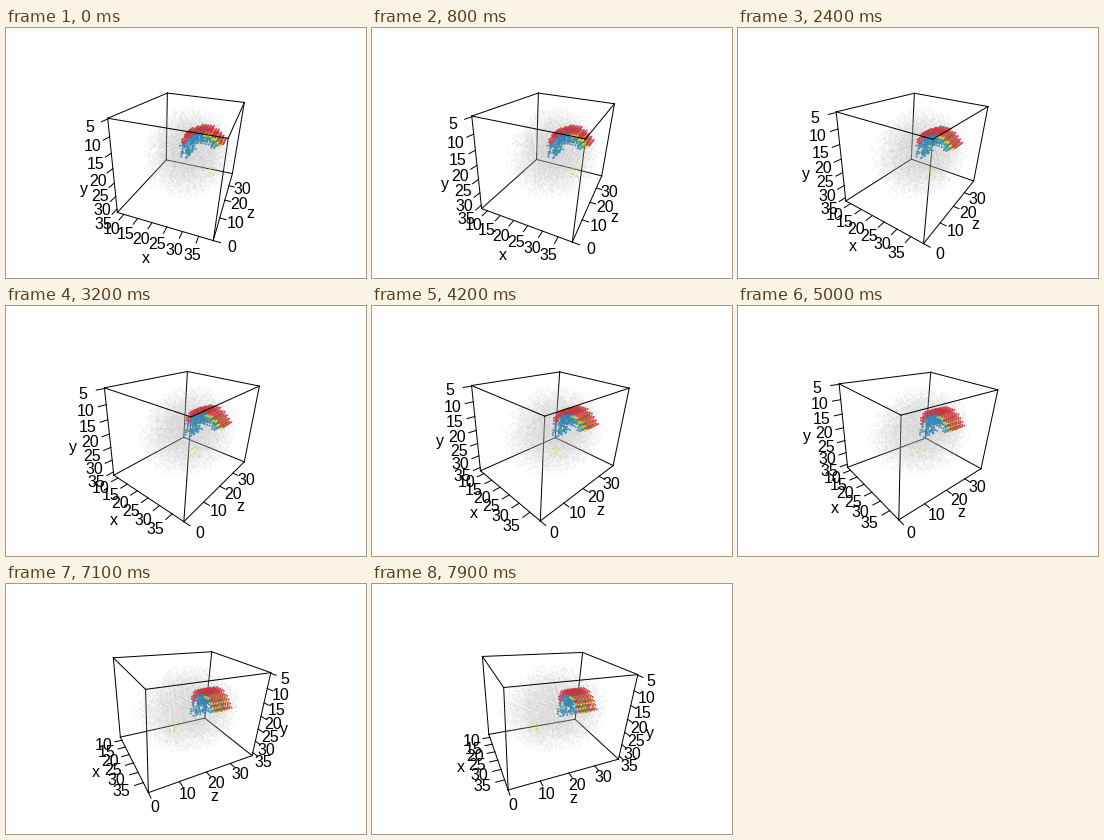
Animation, 360 px wide and 250 px high, one loop 8 s. Source, as a matplotlib script:

```python
import numpy as np
import matplotlib.pyplot as plt
from matplotlib.animation import FuncAnimation
from matplotlib.colors import to_rgba_array

W, H = 360, 250
FRAMES, STEP_MS = 80, 100
FOCAL = 222
START, STEP = 17.0, 0.6            # degrees of spin
TILT, ROLL = np.radians(25.7), np.radians(3.4)
HALF = np.array([0.2026, 0.2016, 0.2572])
LOW = np.array([7.6, 4.8, 0.0])
UNIT = 2 * HALF[1] / 31.6
TICK = 2 * HALF / 15
FONT = dict(family="Liberation Sans", size=11.5, color="black")

# Fixed frame: spin axis (down), sideways and towards the viewer
down = np.array([-np.sin(ROLL) * np.cos(TILT), np.cos(ROLL) * np.cos(TILT), -np.sin(TILT)])
side = np.array([np.cos(ROLL), np.sin(ROLL), 0])
near = np.cross(side, down)


def basis(theta):
    c, s = np.cos(theta), np.sin(theta)
    return np.array([c * side + s * near, down, s * side - c * near])


def project(points, axes):
    cam = np.atleast_2d(points) @ axes
    xy = FOCAL * cam[:, :2] / (1 - cam[:, 2:]) + (W / 2, H / 2)
    return xy, cam[:, 2]


def lattice(half):
    n = np.ceil(half / UNIT).astype(int)
    g = np.meshgrid(*[np.arange(-k, k + 1) * UNIT for k in n], indexing="ij")
    return np.stack([a.ravel() for a in g], axis=1)


rng = np.random.default_rng(4)
cells = lattice(HALF)

# Pale body: an ellipsoid that thins out towards its rim
reach = (((cells - (0.01, -0.005, 0.01)) / HALF) ** 2).sum(1)
body = cells[rng.random(len(cells)) < 1.05 - reach]

# Hook-shaped region: an arch in the x-y plane, coloured by layer
dx, dy, dz = (cells - (0.062, 0.008, 0.095)).T
rho = np.hypot(dx, dy)
phi = np.degrees(np.arctan2(-dy, dx)) % 360
arch = (rho > 0.045) & (rho < 0.114) & (phi > 30) & (phi < 210) & (abs(dz) < 0.045)
arch &= rng.random(len(cells)) < np.where(phi > 150, 0.45, np.where(rho > 0.08, 1, 0.75))
hook, rho, phi, dz = cells[arch], rho[arch], phi[arch], dz[arch]
RED, BLUE, GREEN, YELLOW = "#cf3240", "#3584b8", "#45a049", "#e2d52a"
tint = np.where((rho > 0.09) & (phi < 175), RED, BLUE)
tint[(rho <= 0.09) & (dz > -0.02) & (phi < 85)] = GREEN
tint[(rho > 0.082) & (rho <= 0.092) & (phi < 95)] = YELLOW
tint[rng.random(len(tint)) < 0.08] = GREEN
stray = rng.normal((0.144, -0.01, -0.13), (0.008, 0.014, 0.008), (8, 3))
marks = np.vstack([hook, np.round(stray / UNIT) * UNIT])
rgba = to_rgba_array(np.append(tint, [YELLOW] * len(stray)), alpha=0.85)
rgba[-len(stray):, 3] = 0.6

corners = np.array([(x, y, z) for x in (-1, 1) for y in (-1, 1) for z in (-1, 1)])
edges = [(a, b) for a in corners for b in corners
         if abs(a - b).sum() == 2 and a.sum() < b.sum()]

fig = plt.figure(figsize=(W / 100, H / 100), dpi=100, facecolor="white")
ax = fig.add_axes([0, 0, 1, 1])
ax.set(xlim=(0, W), ylim=(H, 0))
ax.axis("off")


def line(z):
    return ax.plot([], [], color="black", lw=0.72, zorder=z)[0]


box = [line(1) for _ in edges]
cloud, = ax.plot([], [], "s", color="0.74", alpha=0.06, ms=1.7, mew=0, zorder=2)
cloud.set_snap(False)
dots = ax.scatter(np.zeros(len(marks)), np.zeros(len(marks)), s=2.2, lw=0, zorder=3)

# Name, dimension, tick values, value at which the title sits
AXES = [("x", 0, range(10, 36, 5), 24),
        ("y", 1, range(5, 36, 5), 19.5),
        ("z", 2, range(0, 31, 10), 16.5)]


def label(text):
    return ax.text(0, 0, text, ha="center", va="baseline", zorder=5, **FONT)


scales = [(k, vals, [line(4) for _ in vals], [label(str(v)) for v in vals], label(name), at)
          for name, k, vals, at in AXES]


def place(text, point, axes):
    (x, y), = project(point, axes)[0]
    text.set_position((x, y + 5.7))


def draw(i):
    theta = np.radians(START + STEP * i)
    axes = basis(theta)
    for ln, (a, b) in zip(box, edges):
        ln.set_data(*project(np.array([a, b]) * HALF, axes)[0].T)
        front = (a + b)[1] < 0 and (a + b)[2] <= 0
        ln.set_zorder(4 if front else 1)

    cloud.set_data(*project(body, axes)[0].T)
    xy, depth = project(marks, axes)
    order = np.argsort(depth)
    dots.set_offsets(xy[order])
    dots.set_facecolors(rgba[order])

    # The y scale sits on whichever outer edge is closer
    left = HALF[2] * np.cos(theta) > HALF[0] * np.sin(theta) - 0.001
    anchor = [((0, 1, -1), (0, 0, -1)),
              ((-1, 0, -1), (0, 0, -1)) if left else ((1, 0, 1), (1, 0, 0)),
              ((1, 1, 0), (1, 0, 0))]
    for k, vals, ticks, texts, title, at in scales:
        mid, out = np.array(anchor[k][0]) * HALF, np.array(anchor[k][1]) * TICK

        def spot(v):
            p = mid.copy()
            p[k] = (v - LOW[k]) * UNIT - HALF[k]
            return p

        for v, tick, text in zip(vals, ticks, texts):
            p = spot(v)
            tick.set_data(*project([p, p + out], axes)[0].T)
            place(text, p + 2.5 * out, axes)
        place(title, spot(at) + 4.4 * out, axes)
    return [*box, cloud, dots]


anim = FuncAnimation(fig, draw, frames=FRAMES, interval=STEP_MS, repeat=True, repeat_delay=0)
plt.show()
```
